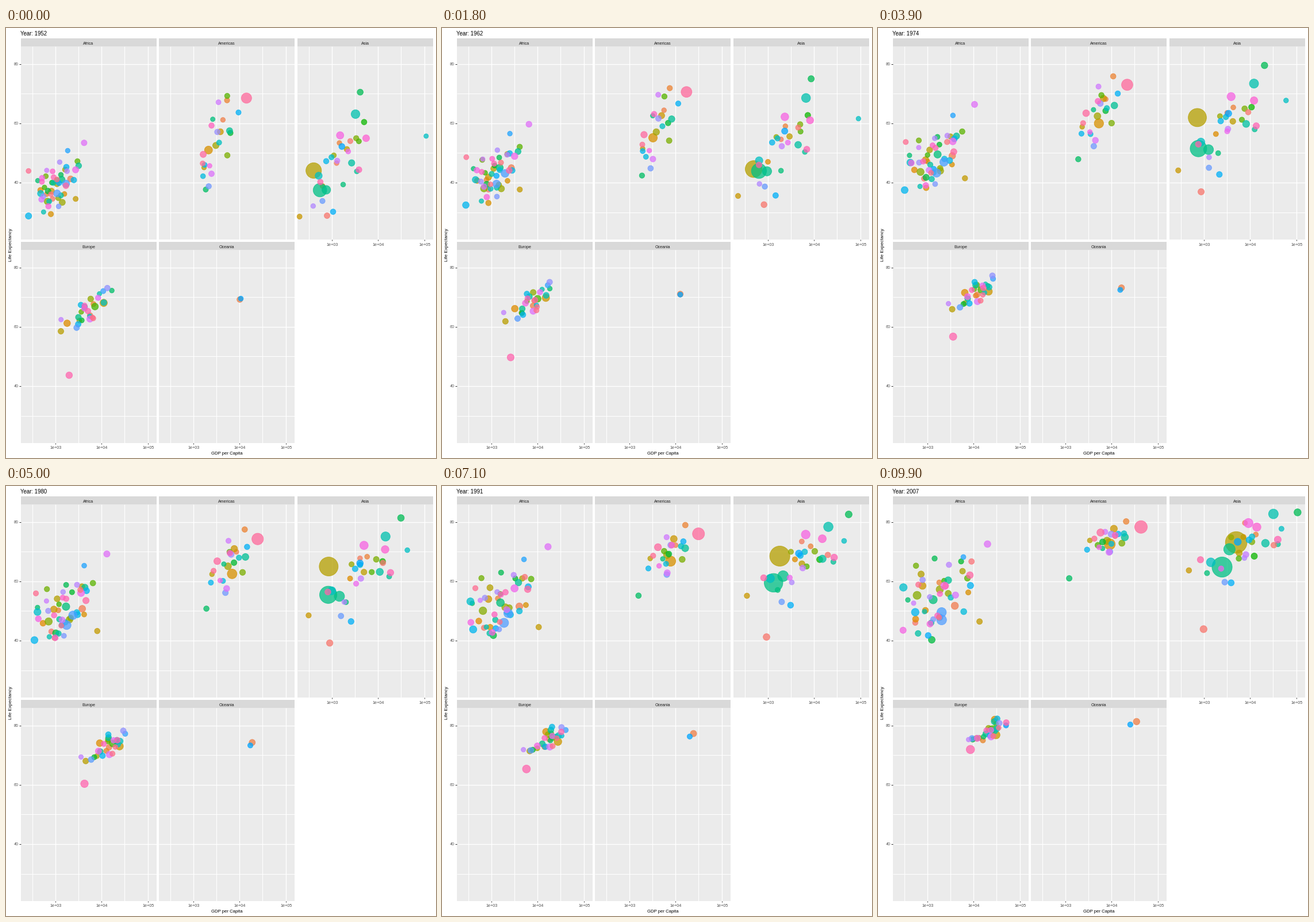
Write a matplotlib script that moves like this. It is 748x748 px and loops after 10000 ms.

```python
import numpy as np
import matplotlib.pyplot as plt
from matplotlib.animation import FuncAnimation
from matplotlib.patches import Rectangle

SIZE, DPI, FRAMES = 748, 100, 100
PX = 72 / DPI                      # points per pixel
plt.rcParams["font.family"] = "Liberation Sans"

# Panels: name, left edge and top edge of the plot area
W, H, STRIP = 236, 336, 14
PANELS = [("Africa", 26, 32), ("Americas", 266, 32), ("Asia", 507, 32),
          ("Europe", 26, 386), ("Oceania", 266, 386)]
AFRICA, AMERICAS, ASIA, EUROPE, OCEANIA = range(5)

YEARS = np.linspace(1952, 2007, FRAMES)
SURVEYS = np.arange(1952, 2008, 5)     # motion is straight between surveys
KEYS = (1952, 1980, 2007)


def to_x(log_gdp, left):
    return left + 60.2 + (log_gdp - 3) * 80.4


def to_y(life, top):
    return top + 30 + (80 - life) * 5.165


def hue_color(h):
    """Polar LUV colour with luminance 65 and chroma 100."""
    a = np.radians(h)
    u = 100 * np.cos(a) / (13 * 65) + 0.19784
    v = 100 * np.sin(a) / (13 * 65) + 0.46834
    y = (81 / 116) ** 3
    xyz = [9 * y * u / (4 * v), y, y * (12 - 3 * u - 20 * v) / (4 * v)]
    rgb = np.array([[3.2405, -1.5371, -0.4985],
                    [-0.9693, 1.8760, 0.0416],
                    [0.0556, -0.2040, 1.0572]]) @ xyz
    rgb = np.clip(rgb, 0, 1)
    return np.where(rgb > 0.00304, 1.055 * rgb ** (1 / 2.4) - 0.055, 12.92 * rgb)


dots = []


def add(panel, tone, pop, years, log_gdp, life):
    """Store one dot's path; tone in 0..1 sets both hue and stacking order."""
    _, left, top = PANELS[panel]
    x = to_x(np.interp(YEARS, years, log_gdp), left)
    y = to_y(np.interp(YEARS, years, life), top)
    radius = 3.8 + 15 * np.sqrt(np.linspace(*pop, FRAMES) / 1319)
    dots.append((tone, x, y, (2 * radius * PX) ** 2))


def star(panel, tone, pop, *points):
    """A dot that stands out, led through (year, income, life span) points."""
    years, gdp, life = zip(*points)
    add(panel, tone, pop, years, np.log10(gdp), life)


def crowd(panel, n, rho, growth, log_gdp, life, gdp_sd, life_sd):
    """A correlated cloud that follows its mean while its members change rank."""
    rng = np.random.default_rng(40 + panel)
    z = np.clip(rng.normal(size=(4, n)), -2, 2)
    z = (z - z.mean(1, keepdims=True)) / z.std(1, keepdims=True)
    turn = (SURVEYS - 1952) / 55 * 0.9
    rich, fit = (z[k][:, None] * np.cos(turn) + z[k + 2][:, None] * np.sin(turn)
                 for k in (0, 1))
    fit = rho * rich + np.sqrt(1 - rho ** 2) * fit

    def spread(mean, sd, score):
        ends = (KEYS[0], KEYS[-1])
        return np.interp(SURVEYS, KEYS, mean) + np.interp(SURVEYS, ends, sd) * score

    tones = rng.permutation((np.arange(n) + rng.random(n)) / n)
    pops = np.clip(np.exp(rng.normal(1.4, 1.2, n)), 0.1, 40)
    for tone, pop, gx, ly in zip(tones, pops, spread(log_gdp, gdp_sd, rich),
                                 spread(life, life_sd, fit)):
        add(panel, tone, (pop, pop * growth), SURVEYS, gx, ly)


crowd(AFRICA, 51, 0.4, 2.8, (3.0, 3.2, 3.25), (39.2, 51, 55), (0.27, 0.42), (5, 9))
crowd(AMERICAS, 22, 0.6, 2.4, (3.5, 3.78, 3.93), (54, 66.3, 74), (0.22, 0.24), (8, 3))
crowd(ASIA, 27, 0.65, 2.6, (3.17, 3.65, 3.85), (47, 62.5, 71), (0.36, 0.5), (8.5, 6))
crowd(EUROPE, 29, 0.85, 1.3, (3.7, 4.14, 4.35), (65.5, 73, 78), (0.27, 0.24), (4.6, 2.6))

star(AFRICA, 0.66, (33, 135), (1952, 1077, 36.3), (1980, 1750, 45.2), (2007, 2014, 46.9))
star(AMERICAS, 0.10, (57, 190), (1952, 2109, 50.9), (1980, 6900, 62.5), (2007, 9066, 72.4))
star(AMERICAS, 0.37, (3, 8), (1952, 1840, 37.6), (1980, 1900, 50.8), (2007, 1202, 60.9))
star(AMERICAS, 0.945, (158, 301), (1952, 13990, 68.4), (1980, 24500, 74.2),
     (2007, 42952, 78.2))
star(ASIA, 0.0, (8, 32), (1952, 779, 28.8), (1980, 890, 39.2), (2007, 975, 43.8))
star(ASIA, 0.17, (556, 1319), (1952, 400, 44), (1962, 488, 44.5), (1968, 613, 59),
     (1980, 850, 65), (2007, 4959, 73))
star(ASIA, 0.41, (372, 1110), (1952, 547, 37.4), (1980, 830, 55.5), (2007, 2452, 64.7))
star(ASIA, 0.416, (82, 224), (1952, 750, 37.5), (1980, 1450, 55), (2007, 3541, 70.7))
star(ASIA, 0.465, (86, 127), (1952, 3217, 63), (1968, 10200, 71.7), (2007, 31656, 82.6))
star(ASIA, 0.50, (0.2, 2.5), (1952, 108382, 55.6), (1968, 81000, 65),
     (1980, 42000, 70.5), (2007, 47307, 77.6))
star(EUROPE, 0.92, (22, 71), (1952, 1969, 43.6), (1980, 4250, 60.4), (2007, 8458, 71.8))
star(OCEANIA, 0.035, (9, 20), (1952, 10040, 69.1), (1980, 18700, 74.2), (2007, 34435, 81.2))
star(OCEANIA, 0.64, (2, 4), (1952, 10557, 69.4), (1980, 17000, 73.2), (2007, 25185, 80.2))

fig = plt.figure(figsize=(SIZE / DPI, SIZE / DPI), dpi=DPI, facecolor="white")
ax = fig.add_axes([0, 0, 1, 1])
ax.set(xlim=(0, SIZE), ylim=(SIZE, 0))
ax.axis("off")


def box(x, y, w, h, color):
    ax.add_patch(Rectangle((x, y), w, h, fc=color, lw=0, antialiased=False))


def line(xs, ys, color, width=1):
    ax.plot(xs, ys, color=color, lw=width * PX, solid_capstyle="butt", zorder=1.5)


def label(x, y, text, px, color="black", ha="center", va="center_baseline", **kw):
    return ax.text(x, y, text, fontsize=px * PX, color=color, ha=ha, va=va, **kw)


def draw_panel(name, left, top):
    box(left, top - STRIP, W, STRIP, "#D9D9D9")
    box(left, top, W, H, "#EBEBEB")
    label(left + W / 2 - 0.5, top - 5.5, name, 7.2, "#1A1A1A")
    for power in np.arange(2.5, 5.1, 0.5):
        major = power % 1 == 0
        x = np.floor(to_x(power, left)) + 0.5
        line([x, x], [top, top + H], "white", 1.4 if major else 1)
        if major and (top > 100 or name == "Asia"):
            line([x, x], [top + H, top + H + 2], "#333333")
            label(x, top + H + 8, f"1e+{int(power):02d}", 7.2, "#4D4D4D")
    for life in range(30, 81, 10):
        major = life % 20 == 0
        y = np.floor(to_y(life, top)) + 0.5
        line([left, left + W], [y, y], "white", 1.4 if major else 1)
        if major and left < 100:
            line([left - 3, left], [y, y], "#333333")
            label(left - 4.5, y, str(life), 7.2, "#4D4D4D", ha="right")


for panel in PANELS:
    draw_panel(*panel)

label(384, 740, "GDP per Capita", 7.8)
label(9, 377, "Life Expectancy", 8.2, va="center", rotation=90)
title = label(25.5, 9, "", 9.6, ha="left")

dots.sort(key=lambda d: d[0])
tones, xs, ys, areas = (np.array(part) for part in zip(*dots))
colors = [(*hue_color(15 + 360 * tone), 0.75) for tone in tones]
marks = ax.scatter(xs[:, 0], ys[:, 0], s=areas[:, 0], c=colors,
                   edgecolors=colors, linewidths=0.9 * PX, zorder=3)


def draw(i):
    title.set_text(f"Year: {round(YEARS[i])}")
    marks.set_offsets(np.column_stack([xs[:, i], ys[:, i]]))
    marks.set_sizes(areas[:, i])
    return marks, title


anim = FuncAnimation(fig, draw, frames=FRAMES, interval=100, repeat=True)
plt.show()
```
